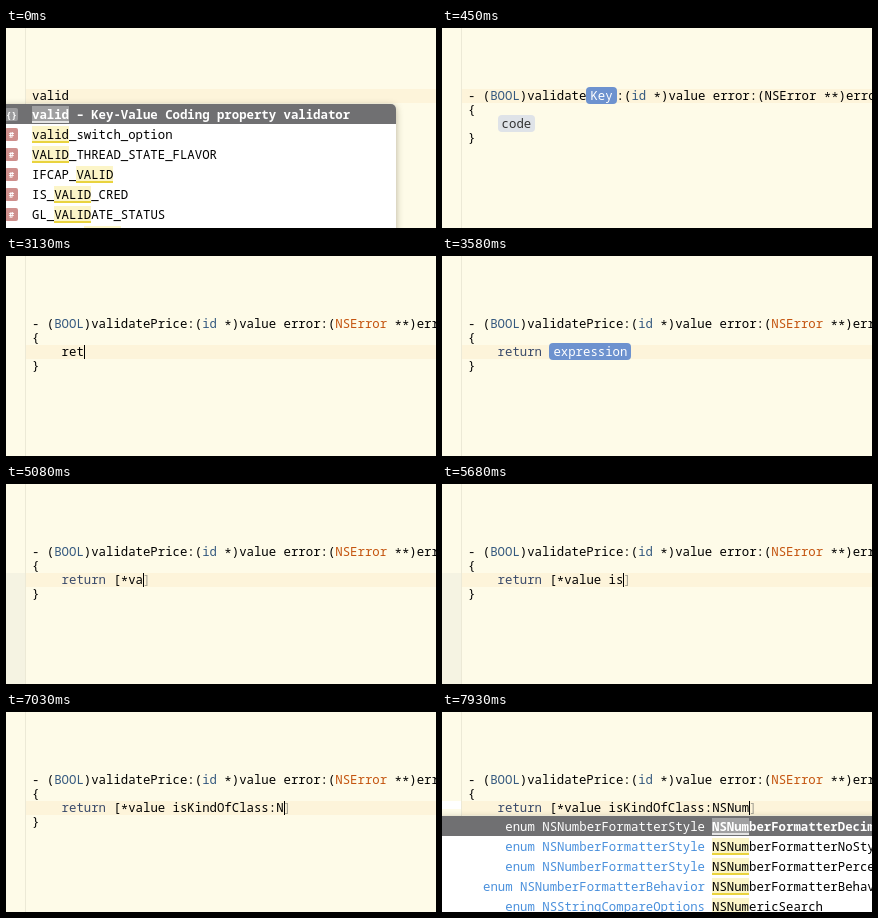
An HTML page for the animation above (8000 ms loop, 430x200 px).

```html
<!DOCTYPE html>
<html lang="en">
<head>
<meta charset="utf-8">
<title>Code completion</title>
<style>
html, body { margin: 0; width: 100%; height: 100%; overflow: hidden; background: #fefbe8; }
#stage {
  position: relative; width: 430px; height: 200px; overflow: hidden;
  font: 12.33px/14px "Noto Sans Mono", "DejaVu Sans Mono", monospace;
  color: #000; white-space: pre;
}
#stage div { position: absolute; }
.gutter { left: 0; top: 0; width: 19px; height: 200px; border-right: 1px solid #ece9d6; }
.dim, .lit { left: 0; top: 89px; width: 19px; }
.dim { height: 111px; background: #f5f3e2; }
.lit { height: 8px; background: #fff; }
.band { left: 20px; width: 410px; height: 14px; background: #fdf4da; }
.line { left: 26px; height: 14px; }
.kw { color: #3a4a6a; }
.type { color: #35597f; }
.cls { color: #c4540f; }
.soft { color: #a3a093; }
.star { position: relative; top: 2px; }
.token { padding: 0 4px; border-radius: 4px; background: #dfe3e8; color: #333; }
.token.on { background: #6d92cf; color: #fff; }
.caret { position: absolute; width: 1px; height: 14px; background: #000; }
.popup { background: #fff; border-radius: 5px; box-shadow: 0 2px 7px rgba(70, 60, 30, .4); overflow: hidden; }
.row { left: 0; width: 100%; height: 20px; line-height: 22px; }
.row.on { background: #707072; color: #fff; }
.row.on .name { font-weight: 700; }
.ret { color: #4a90dc; }
.row.on .ret { color: #fff; }
.hit { background: #fcf5c8; box-shadow: inset 0 -2px #e9d33f; }
.row.on .hit { background: #a0a0a1; box-shadow: inset 0 -2px #e4e4e4; }
.icon {
  top: 4px; width: 13px; height: 13px; border-radius: 2px;
  font: 700 9px/13px "Noto Sans Mono", monospace; text-align: center; color: #fff;
}
</style>
</head>
<body>
<div id="stage"></div>
<script>
const LOOP = 8000;
const stage = document.getElementById("stage");

const span = (cls, text) => `<span class="${cls}">${text}</span>`;
const caret = '<i class="caret"></i>';
const star = span("star", "*");
const token = (text, on) => span("token" + (on ? " on" : ""), text);

const signature = (key, cls = "cls") =>
  `- (${span("type", "BOOL")})validate${key}:(${span("type", "id")} ${star})value error:(` +
  `${span(cls, "NSError")} ${star + star})error`;

// Popup lists: text column, box and rows of [name, type, icon, icon colour]
const macro = name => [name, "", "#", "#cf908d"];
const lists = {
  valid: {
    x: 26, box: [-12, 76, 402, 140], rows: [
      ["valid – Key-Value Coding property validator", "", "{}", "#9a9a9c"],
      ...["valid_switch_option", "VALID_THREAD_STATE_FLAVOR", "IFCAP_VALID",
        "IS_VALID_CRED", "GL_VALIDATE_STATUS", "CS_DEV_VALID"].map(macro)]
  },
  method: {
    x: 85, box: [47, 76, 420, 48], rows: [
      ["validateValue:(inout id  _Nullable __autoreleasing *)ioValue", "", "M", "#5577b8"]]
  },
  ret: {
    x: 56, box: [8, 104, 228, 110], rows: [
      ["return", "", "{}", "#9a9a9c"],
      ...["retain", "retainCount", "retainArguments", "RETURN_SUCCESS"].map(macro)]
  },
  is: {
    x: 167, box: [-8, 104, 450, 110], rows: [
      ["isKindOfClass:(Class)aClass", "BOOL"],
      ["isEqual:(id)object", "BOOL"],
      ["isMemberOfClass:(Class)aClass", "BOOL"],
      ["isProxy", "BOOL"],
      ["isSubclassOfClass:(Class)aClass", "BOOL"]]
  },
  num: {
    x: 270, box: [-8, 104, 450, 110], rows: [
      ["NSNumberFormatterDecimalStyle", "enum NSNumberFormatterStyle"],
      ["NSNumberFormatterNoStyle", "enum NSNumberFormatterStyle"],
      ["NSNumberFormatterPercentStyle", "enum NSNumberFormatterStyle"],
      ["NSNumberFormatterBehaviorDefault", "enum NSNumberFormatterBehavior"],
      ["NSNumericSearch", "enum NSStringCompareOptions"]]
  }
};

function markHit(name, hit) {
  const at = name.toLowerCase().indexOf(hit.toLowerCase());
  if (at < 0) return name;
  const end = at + hit.length;
  return name.slice(0, at) + span("hit", name.slice(at, end)) + name.slice(end);
}

function popup(id, hit, alpha = 1) {
  const { x, box: [left, top, width, height], rows } = lists[id];
  const col = x - left;
  const html = rows.map(([name, type, icon, color], i) =>
    `<div class="row${i ? "" : " on"}" style="top:${i * 20}px">` +
    (icon ? `<div class="icon" style="left:${col - 27}px;background:${color}">${icon}</div>` : "") +
    (type ? `<div class="ret" style="right:${width - col + 7}px">${type}</div>` : "") +
    `<div class="name" style="left:${col}px">${markHit(name, hit)}</div></div>`).join("");
  return `<div class="popup" style="left:${left}px;top:${top}px;width:${width}px;` +
    `height:${height}px;opacity:${alpha}">${html}</div>`;
}

// Scenes: start time, picture parts; shade is the gutter's tint class
const scenes = [];
const add = (t, head, body, band, pop = "", shade = "") =>
  scenes.push({ t, head, body, band, pop, shade });

const naming = (t, key, pop, cls = "") =>
  add(t, signature(key, cls), token("code"), 61, pop);
const coding = (t, body, pop, shade) =>
  add(t, signature("Price"), body, 89, pop, shade);
const typing = (t, text, pop) => coding(t, text + caret, pop);
const message = (t, text, pop, shade) =>
  coding(t, span("kw", "return") + " [" + text + caret + span("soft", "]"), pop, shade);

add(0, "valid", null, 61, popup("valid", "valid"));
naming(450, token("Key", true));
naming(1500, "P" + caret, popup("method", "validate"));
naming(1640, "Pr" + caret, popup("method", "validate"));
naming(1790, "Pri" + caret, popup("method", "validate", .66));
naming(1940, "Price" + caret);
coding(2390, token("code", true));
typing(2990, "r");
typing(3130, "ret");
typing(3280, "retu", popup("ret", "ret"));
typing(3430, "retur", popup("ret", "ret"));
coding(3580, span("kw", "return") + " " + token("expression", true));
message(4330, "");
[[4780, ""], [4930, "v"], [5080, "va"], [5230, "val"], [5380, "value"],
  [5530, "value "], [5680, "value is"]].forEach(([t, text]) => message(t, star + text, "", "dim"));
[[5980, "isK"], [6130, "isKi"], [6280, "isKin"]]
  .forEach(([t, text]) => message(t, star + "value " + text, popup("is", text)));

const kindOf = star + "value isKindOfClass:";
coding(6580, span("kw", "return") + " [" + kindOf + token("(Class)", true) + span("soft", "]"));
message(7030, kindOf + "N");
message(7630, kindOf + "NS");
message(7780, kindOf + "NSNu");
message(7930, kindOf + "NSNum", popup("num", "NSNum"), "lit");

const line = (n, html) => `<div class="line" style="top:${61 + n * 14}px">${html}</div>`;

function draw({ head, body, band, pop, shade }) {
  stage.innerHTML =
    `<div class="gutter"></div><div class="${shade}"></div>` +
    `<div class="band" style="top:${band}px"></div>` + line(0, head) +
    (body === null ? "" : line(1, "{") + line(2, "    " + body) + line(3, "}")) + pop;
}

let shown = null;
function tick() {
  const t = performance.now() % LOOP;
  const scene = scenes.findLast(s => s.t <= t);
  if (scene !== shown) draw(shown = scene);
  requestAnimationFrame(tick);
}
tick();
</script>
</body>
</html>
```
